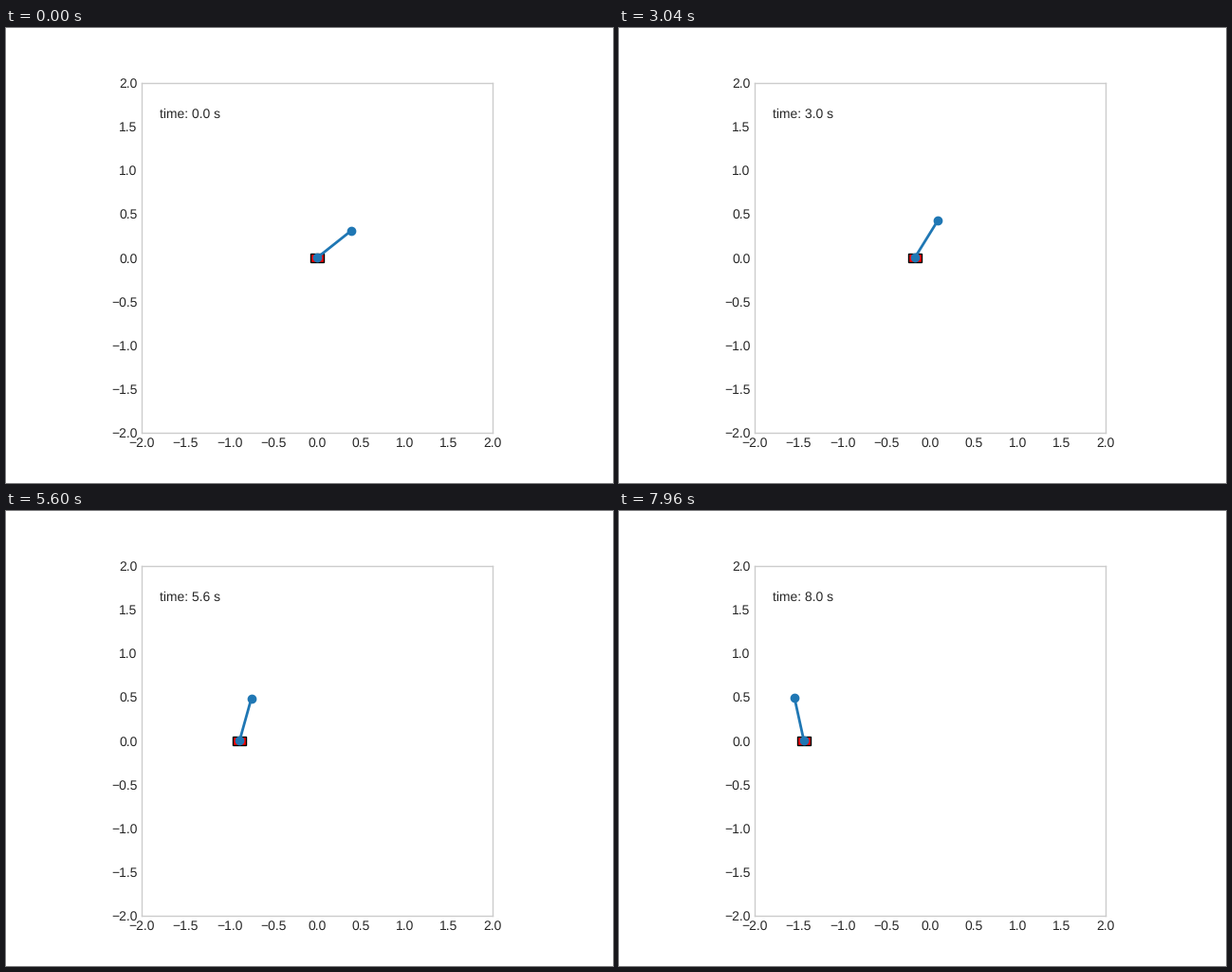
Recreate the animation shown at these times as a matplotlib script. Size 640 px wide and 480 px high, loop 8000 ms.

```python
import numpy as np
import matplotlib.pyplot as plt
from matplotlib.animation import FuncAnimation
from matplotlib.patches import Rectangle

FRAMES, DT = 200, 0.04
G, L = 9.8, 0.5
M_CART, M_BOB = 0.5, 0.2
MU = M_BOB / (M_CART + M_BOB)
THETA0 = 0.9            # angle from upright
T_CATCH = 1.88          # balancing starts here
REACH = 0.567           # cart offset for a fully tilted pole
CART_W, CART_H = 0.15, 0.1
INK = "0.15"


def fall_rate(state):
    th, om = state
    s, c = np.sin(th), np.cos(th)
    acc = (G * s - MU * L * om**2 * s * c) / (L * (1 - MU * c**2))
    return np.array([om, acc])


def free_swing(steps, sub=10):
    """Angles of the uncontrolled pole, one per frame (RK4)."""
    state, h = np.array([THETA0, 0.0]), DT / sub
    angles = [THETA0]
    for _ in range(steps):
        for _ in range(sub):
            k1 = fall_rate(state)
            k2 = fall_rate(state + h / 2 * k1)
            k3 = fall_rate(state + h / 2 * k2)
            k4 = fall_rate(state + h * k3)
            state = state + h / 6 * (k1 + 2 * k2 + 2 * k3 + k4)
        angles.append(state[0])
    return angles


SWING = free_swing(round(T_CATCH / DT))


def falling(i):
    """Free swing: the cart recoils against the bob and drifts slowly."""
    th = SWING[i]
    x = 0.0266 * i * DT + MU * L * (np.sin(THETA0) - np.sin(th))
    return x, th


def balancing(s):
    """Decaying sway, slow at first, around a steady drift to the left."""
    half_turns = 4.85 * s - 2.31 * np.tanh(0.92 * s)
    sway = -0.455 * np.exp(-0.19 * s) * np.cos(np.pi * half_turns)
    lurch = 0.29 * np.exp(-s) * np.sin(3.4 * s - 0.27)
    x = 0.578 - 0.352 * s + lurch + sway
    return x, np.arcsin(-sway / REACH)


def pose(i):
    """Cart position and pole angle at frame i."""
    s = i * DT - T_CATCH
    return falling(i) if s < -DT / 2 else balancing(s)


plt.rcParams.update({
    "font.family": "Liberation Sans",
    "font.size": 10,
    "text.color": INK,
    "text.hinting": "none",
    "axes.edgecolor": "0.8",
    "axes.linewidth": 1.0,
    "lines.solid_capstyle": "round",
})

fig = plt.figure(figsize=(6.4, 4.8), dpi=100, facecolor="white")
ax = fig.add_subplot(111, aspect="equal", xlim=(-2, 2), ylim=(-2, 2))
ticks = np.arange(-2, 2.1, 0.5)
ax.set_xticks(ticks)
ax.set_yticks(ticks)
ax.tick_params(length=0, pad=3.5, labelcolor=INK)

cart = ax.add_patch(Rectangle((0, 0), CART_W, CART_H, facecolor="red",
                              edgecolor="black", linewidth=1))
pole, = ax.plot([], [], "o-", color="#1f77b4", lw=2, markersize=6)
clock = ax.text(0.05, 0.9, "", transform=ax.transAxes)


def draw(i):
    x, th = pose(i)
    cart.set_xy((x - CART_W / 2, -CART_H / 2))
    pole.set_data([x, x + L * np.sin(th)], [0, L * np.cos(th)])
    clock.set_text(f"time: {i * DT:.1f} s")
    return cart, pole, clock


anim = FuncAnimation(fig, draw, frames=FRAMES, interval=40,
                     init_func=lambda: draw(0), repeat=True, repeat_delay=0)
plt.show()
```
